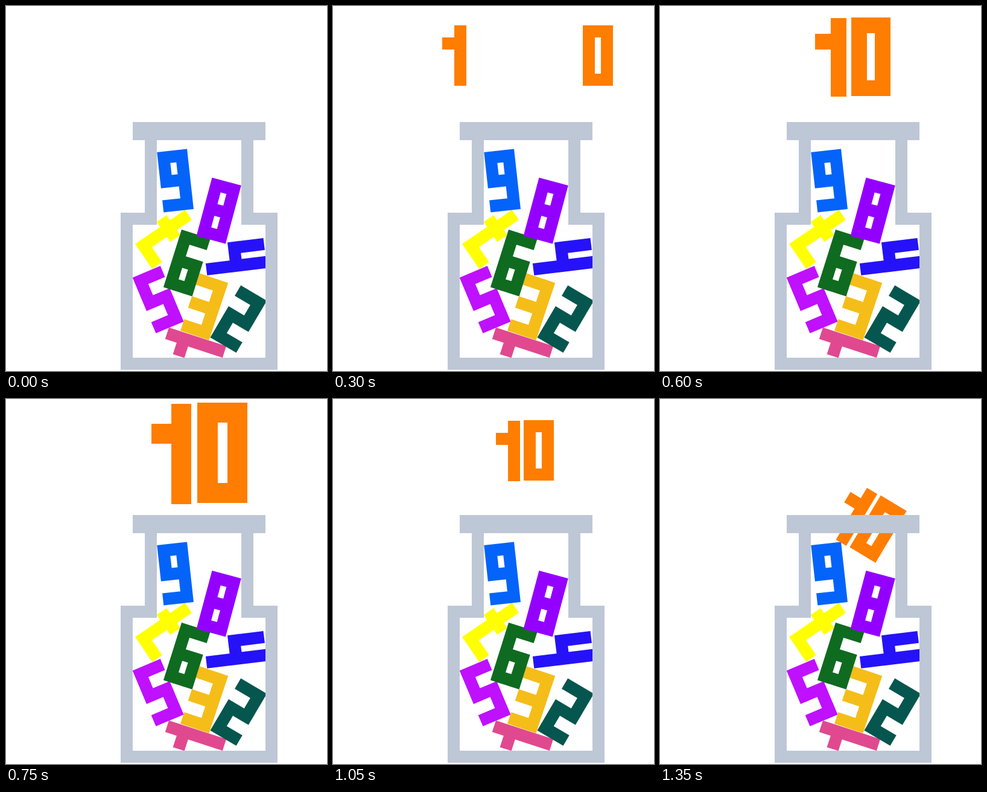
These frames come from a looping animation (532x604 px, 1500 ms). An HTML page with a canvas:

```html
<!DOCTYPE html>
<html lang="en">
<head>
<meta charset="utf-8">
<title>Jar of numbers</title>
<style>
  html, body { margin: 0; width: 100%; height: 100%; overflow: hidden; background: #fff; }
  canvas { display: block; width: 532px; height: 604px; }
</style>
</head>
<body>
<canvas id="stage" width="532" height="604"></canvas>
<script>
const ctx = document.getElementById('stage').getContext('2d');
const STEP = 150;
const LOOP = 1500;
const ORANGE = '#ff7d00';
const GLASS = '#bec7d6';

// Block digits, 50 by 100 with bars 20 thick:
// t m b = top, middle, bottom bar; capitals = upper arms, l r = lower arms;
// s = the stem of one, f = its flag, x = the crossbar of seven.
const bar = y => [0, y, 50, 20];
const arm = (x, y) => [x, y, 20, 60];
const strokes = {
  t: bar(0), m: bar(40), b: bar(80),
  L: arm(0, 0), R: arm(30, 0), l: arm(0, 40), r: arm(30, 40),
  s: [20, 0, 20, 100], f: [0, 20, 20, 20], x: [20, 50, 40, 20]
};
const digits = ['tbLRlr', 'sf', 'tRmlb', 'tRmrb', 'LRmr', 'tLmrb', 'tLmblr', 'tRrx', 'tmbLRlr', 'tmbLRr'];

// digit, corner x and y, degrees, colour
const pile = [
  [1, 257.6, 570, -72, '#e0498f'],
  [2, 389.2, 462.3, 30.5, '#05564e'],
  [3, 320.8, 442.3, 18.5, '#f5bd18'],
  [4, 426.5, 384, 83, '#2612f8'],
  [5, 209.7, 449.4, -22.8, '#bf10ff'],
  [6, 291, 370, 17.5, '#0f6b20'],
  [7, 242.2, 435, -124.3, '#ffff00'],
  [8, 341.5, 284, 15, '#9400ff'],
  [9, 250.3, 242.1, -6.3, '#0463f9']
];

// Upright digits sit on whole pixels.
function digit(n, x, y, deg, color, size = 1, dx = 0, dy = 0) {
  const cos = size * Math.cos(deg * Math.PI / 180);
  const sin = size * Math.sin(deg * Math.PI / 180);
  const snap = deg ? v => v : Math.round;
  const corner = (u, v) => {
    u += dx;
    v += dy;
    return [snap(x + u * cos - v * sin), snap(y + u * sin + v * cos)];
  };
  ctx.beginPath();
  for (const name of digits[n]) {
    const [u, v, w, h] = strokes[name];
    ctx.moveTo(...corner(u, v));
    ctx.lineTo(...corner(u + w, v));
    ctx.lineTo(...corner(u + w, v + h));
    ctx.lineTo(...corner(u, v + h));
    ctx.closePath();
  }
  ctx.fillStyle = color;
  ctx.fill();
}

function ten(x, y, size = 1, deg = 0) {
  digit(1, x, y, deg, ORANGE, size, 0, 1);
  digit(0, x, y, deg, ORANGE, size, 46, 0);
}

function apart(left, right, y) {
  digit(1, left, y, 0, ORANGE);
  digit(0, right, y, 0, ORANGE);
}

function jar() {
  const half = [[80, 222], [80, 352], [120, 352], [120, 592]];
  ctx.beginPath();
  half.forEach(([x, y]) => ctx.lineTo(320 - x, y));
  half.reverse().forEach(([x, y]) => ctx.lineTo(320 + x, y));
  ctx.strokeStyle = ctx.fillStyle = GLASS;
  ctx.lineWidth = 20;
  ctx.stroke();
  ctx.fillRect(210, 192, 220, 30);
}

const joined = () => ten(270, 35);
const grown = () => ten(257, 19, 1.3);

// Slide together, pulse, then drop into the jar.
const poses = [
  () => {},
  () => apart(14, 482, 25),
  () => apart(181, 414, 32),
  joined,
  grown,
  () => ten(241, 6, 1.66),
  grown,
  joined,
  () => ten(268, 135),
  () => ten(326.4, 135.8, 1, 31)
];

function frame(time) {
  ctx.fillStyle = '#fff';
  ctx.fillRect(0, 0, 532, 604);
  pile.forEach(item => digit(...item));
  poses[Math.floor((time % LOOP) / STEP)]();
  jar();
}

const start = performance.now();
function tick() {
  frame(performance.now() - start);
  requestAnimationFrame(tick);
}
tick();
</script>
</body>
</html>
```
